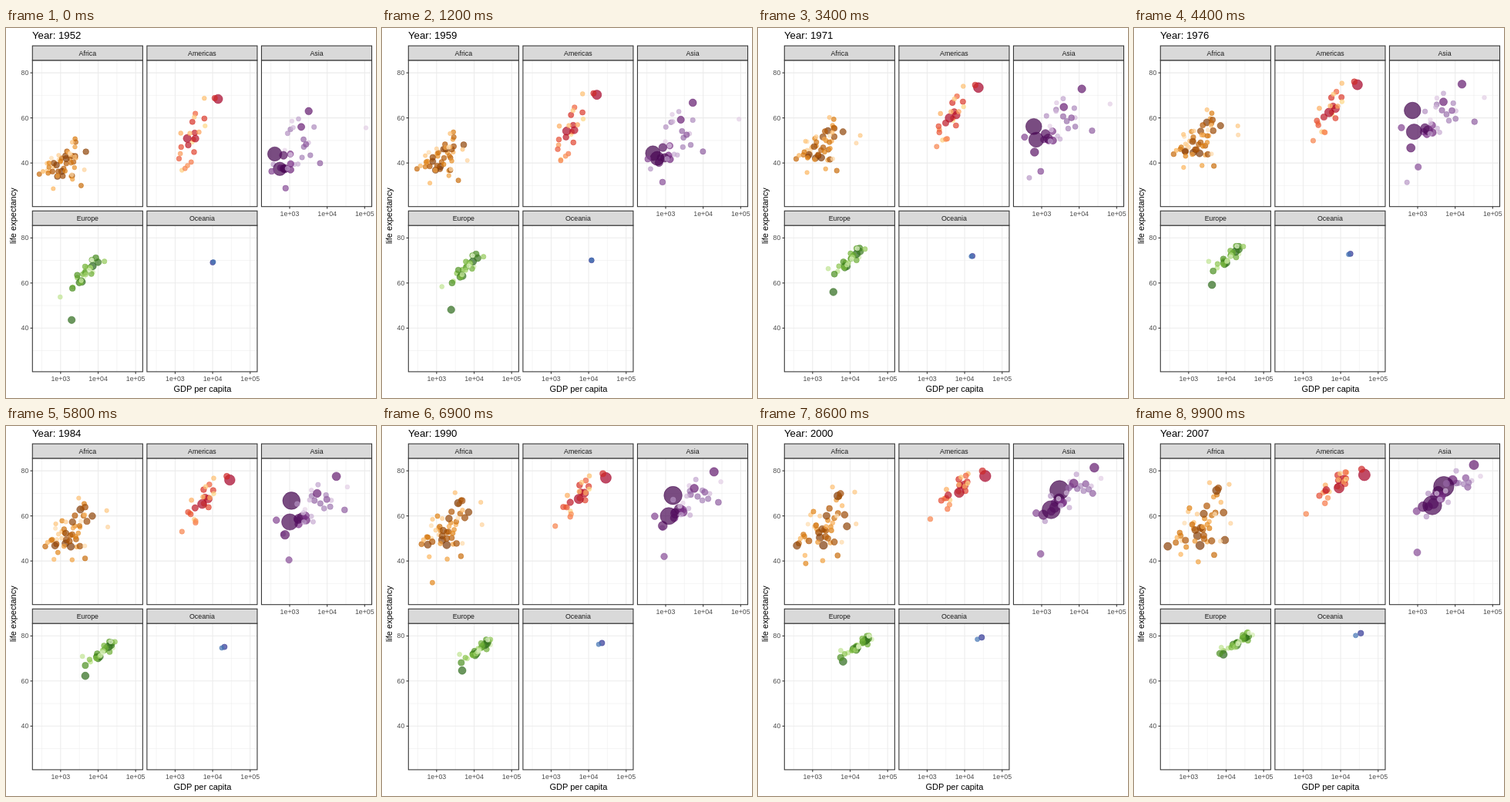
An HTML page for the animation above (10000 ms loop, 480 by 480 pixels).

```html
<!DOCTYPE html>
<html lang="en">
<head>
<meta charset="utf-8">
<title>Life expectancy and GDP</title>
<style>
html, body { margin: 0; width: 100%; height: 100%; overflow: hidden; background: #fff; }
svg { display: block; width: 480px; height: 480px; font: 8.8px "Liberation Sans", Arial, sans-serif; }
.major, .minor { stroke: #ebebeb; stroke-width: 1.07; }
.minor { stroke-width: .53; }
.tick { stroke: #333; stroke-width: 1.07; }
.frame { fill: none; stroke: #333; stroke-width: 1.07; }
.strip { fill: #d9d9d9; stroke: #333; stroke-width: 1.07; }
.label { fill: #1a1a1a; text-anchor: middle; }
.axis { fill: #4d4d4d; text-anchor: middle; }
.side { text-anchor: end; }
.name { font-size: 11px; text-anchor: middle; }
.title { font-size: 13.2px; }
.dot { stroke-width: .7; fill-opacity: .7; stroke-opacity: .7; }
</style>
</head>
<body>
<svg id="stage" viewBox="0 0 480 480"></svg>
<script>
const stage = document.getElementById('stage');
const FIRST = 1952, LAST = 2007, FRAMES = 100, STEP = 100;
const WIDE = 143.07, HIGH = 189.8, GAP = 5.5;

const xOf = logGdp => (logGdp - 2.249) * 48.66;
const yOf = life => (85.55 - life) * 2.925;
const mix = (a, b, k) => a + (b - a) * k;

let seed = 7;
const random = () => (seed = seed * 16807 % 2147483647) / 2147483647;
const bell = () => (random() + random() - 1) * 2.2;

// trend:   year, log GDP, life of the typical country
// spread:  GDP deviation, life per GDP decade, life deviation; at start and end
// leaders: by population rank, points of year, GDP, life
const regions = [
  {
    name: 'Africa', col: 0, row: 0, count: 52, past: .3,
    ramp: ['7f3b08', 'b35806', 'e08214', 'fdb863', 'fee0b6'],
    people: i => 105 * Math.exp(-.105 * i),
    trend: [[1952, 2.96, 39.2], [1967, 3.06, 45.2], [1977, 3.13, 49.5], [1987, 3.11, 53.2], [2007, 3.18, 55]],
    spread: [[.26, 5, 4.5], [.38, 9, 6.5]],
    leaders: {
      0: [[1952, 1077, 36.3], [1977, 1982, 44.5], [2007, 2014, 46.9]],
      1: [[1952, 1419, 41.9], [2007, 5581, 71.3]],
      3: [[1952, 781, 39.1], [1987, 673, 47.4], [2007, 278, 46.5]],
      4: [[1952, 4725, 45], [1992, 7226, 61.9], [2007, 9270, 49.3]],
      9: [[1952, 2449, 43.1], [2007, 6223, 72.3]],
      19: [[1952, 3521, 30], [2007, 4797, 42.7]],
      27: [[1952, 493, 40], [1987, 848, 44], [1992, 737, 23.6], [1997, 590, 36.1], [2007, 863, 46.2]],
      43: [[1952, 2388, 42.7], [1972, 21011, 52.8], [2007, 12057, 74]],
      47: [[1952, 4293, 37], [1977, 21746, 52.8], [2007, 13206, 56.7]]
    }
  },
  {
    name: 'Americas', col: 1, row: 0, count: 25, past: .45,
    ramp: ['a50026', 'd73027', 'f46d43', 'fdae61', 'fee090'],
    people: i => [301, 190, 109][i] || 46 * Math.exp(-.15 * (i - 3)),
    trend: [[1952, 3.5, 53.5], [1967, 3.64, 60.6], [1977, 3.77, 64.8], [1992, 3.75, 70], [2007, 3.9, 74]],
    spread: [[.2, 20, 6], [.24, 9, 2.5]],
    leaders: {
      0: [[1952, 13990, 68.4], [2007, 42952, 78.2]],
      1: [[1952, 2109, 50.9], [2007, 9066, 72.4]],
      2: [[1952, 3478, 50.8], [2007, 11978, 76.2]],
      5: [[1952, 11367, 68.8], [2007, 36319, 80.7]],
      13: [[1952, 2677, 40.4], [2007, 3822, 65.6]],
      14: [[1952, 1840, 37.6], [2007, 1202, 60.9]]
    }
  },
  {
    name: 'Asia', col: 2, row: 0, count: 33, past: .4,
    ramp: ['40004b', '762a83', '9970ab', 'c2a5cf', 'e7d4e8'],
    people: i => [1319, 1110][i] || 240 * Math.exp(-.16 * (i - 2)),
    trend: [[1952, 3.2, 48], [1967, 3.42, 56.3], [1977, 3.6, 61.2], [1992, 3.68, 67.8], [2007, 3.85, 72]],
    spread: [[.3, 12, 6], [.42, 9, 3]],
    leaders: {
      0: [[1952, 400, 44], [1962, 488, 44.5], [1977, 741, 64], [2007, 4959, 73]],
      1: [[1952, 547, 37.4], [1977, 813, 54.2], [2007, 2452, 64.7]],
      2: [[1952, 750, 37.5], [2007, 3541, 70.7]],
      3: [[1952, 685, 43.4], [2007, 2606, 65.5]],
      4: [[1952, 684, 37.5], [1977, 660, 46.9], [2007, 1391, 64.1]],
      5: [[1952, 3217, 63], [1967, 9848, 71.4], [2007, 31656, 82.6]],
      11: [[1952, 331, 36.3], [1977, 371, 56.1], [2007, 944, 62.1]],
      12: [[1952, 779, 28.8], [1982, 978, 39.9], [2007, 975, 43.8]],
      14: [[1952, 6460, 39.9], [1977, 34168, 58.7], [2007, 21655, 72.8]],
      22: [[1952, 368, 39.4], [1977, 525, 31.2], [1982, 624, 51], [2007, 1714, 59.7]],
      31: [[1952, 108382, 55.6], [1977, 59265, 69.3], [1987, 28118, 74.2], [2007, 47307, 77.6]]
    }
  },
  {
    name: 'Europe', col: 0, row: 1, count: 30, past: .72,
    ramp: ['276419', '4d9221', '7fbc41', 'b8e186', 'e6f5d0'],
    people: i => 88 * Math.exp(-.145 * i),
    trend: [[1952, 3.68, 65], [1967, 3.94, 69.8], [1977, 4.1, 71.9], [1992, 4.14, 74.4], [2007, 4.36, 77.6]],
    spread: [[.21, 15, 2], [.25, 9, 1]],
    leaders: {
      0: [[1952, 7144, 67.5], [2007, 32170, 79.4]],
      1: [[1952, 1969, 43.6], [1977, 4269, 59.5], [2007, 8458, 71.8]],
      3: [[1952, 9980, 69.2], [2007, 33203, 79.4]],
      17: [[1952, 14734, 69.6], [2007, 37506, 81.7]],
      23: [[1952, 974, 53.8], [1977, 3528, 69.9], [2007, 7446, 74.9]]
    }
  },
  {
    name: 'Oceania', col: 1, row: 1, count: 2, past: .45,
    ramp: ['313695', '4575b4'],
    people: i => [20, 4][i],
    trend: [[1952, 4.01, 69.2], [1967, 4.16, 71.2], [1977, 4.24, 72.9], [1992, 4.32, 77], [2007, 4.47, 80.7]],
    leaders: {
      0: [[1952, 10040, 69.1], [2007, 34435, 81.2]],
      1: [[1952, 10557, 69.4], [2007, 25185, 80.2]]
    }
  }
];

// Point of a path of [year, x, y] at a given year
function along(path, year) {
  let i = 1;
  while (i < path.length - 1 && path[i][0] < year) i++;
  const a = path[i - 1], b = path[i], k = (year - a[0]) / (b[0] - a[0]);
  return [mix(a[1], b[1], k), mix(a[2], b[2], k)];
}

function shade(ramp, k) {
  const at = k * (ramp.length - 1), i = Math.min(Math.floor(at), ramp.length - 2);
  const part = (hex, c) => parseInt(hex.slice(c * 2, c * 2 + 2), 16);
  return `rgb(${[0, 1, 2].map(c => Math.round(mix(part(ramp[i], c), part(ramp[i + 1], c), at - i)))})`;
}

function add(parent, tag, attrs, text) {
  const el = document.createElementNS('http://www.w3.org/2000/svg', tag);
  for (const key in attrs) el.setAttribute(key, attrs[key]);
  if (text) el.textContent = text;
  parent.appendChild(el);
  return el;
}
const line = (parent, cls, x1, y1, x2, y2) => add(parent, 'line', { class: cls, x1, y1, x2, y2 });

function buildPanel({ name, col, row }) {
  const left = 34.3 + col * (WIDE + GAP), top = 41.9 + row * 214.2;
  const g = add(stage, 'g', { transform: `translate(${left} ${top})` });
  for (const v of [2.5, 3.5, 4.5]) line(g, 'minor', xOf(v), 0, xOf(v), HIGH);
  for (const v of [30, 50, 70]) line(g, 'minor', 0, yOf(v), WIDE, yOf(v));
  for (const v of [3, 4, 5]) {
    line(g, 'major', xOf(v), 0, xOf(v), HIGH);
    if (row || col === 2) {
      line(g, 'tick', xOf(v), HIGH, xOf(v), HIGH + 2.8);
      add(g, 'text', { class: 'axis', x: xOf(v), y: HIGH + 12.2 }, '1e+0' + v);
    }
  }
  for (const v of [40, 60, 80]) {
    line(g, 'major', 0, yOf(v), WIDE, yOf(v));
    if (!col) {
      line(g, 'tick', -2.8, yOf(v), 0, yOf(v));
      add(g, 'text', { class: 'axis side', x: -5, y: yOf(v) + 3.1 }, v);
    }
  }
  const layer = add(g, 'g', {});
  add(g, 'rect', { class: 'frame', width: WIDE, height: HIGH });
  add(g, 'rect', { class: 'strip', y: -18.8, width: WIDE, height: 18.8 });
  add(g, 'text', { class: 'label', x: WIDE / 2, y: -6.1 }, name);
  return layer;
}

// Offsets from the trend, for a named path or a random member of the crowd
function leaderPath(points, trend) {
  return points.map(([year, gdp, life]) => {
    const [g, l] = along(trend, year);
    return [year, Math.log10(gdp) - g, life - l];
  });
}
function crowdPath([start, end]) {
  const rich = bell(), fit = bell();
  const point = (year, [dev, slope, noise], a, b) => [year, a * dev, a * dev * slope + b * noise];
  return [
    point(FIRST, start, rich, fit),
    point(LAST, end, rich * .8 + bell() * .5, fit * .7 + bell() * .6)
  ];
}

function buildDots(region) {
  const { count, trend, spread, leaders, ramp, people, past } = region;
  const layer = buildPanel(region);
  return Array.from({ length: count }, (_, i) => {
    const color = shade(ramp, i / (count - 1));
    const el = add(layer, 'circle', { class: 'dot', fill: color, stroke: color });
    if (i % 2 === 0) layer.prepend(el);
    const path = leaders[i] ? leaderPath(leaders[i], trend) : crowdPath(spread);
    return { el, path, trend, people: people(i), past };
  });
}

const dots = regions.flatMap(buildDots);
add(stage, 'text', { class: 'name', x: 255, y: 472 }, 'GDP per capita');
add(stage, 'text', { class: 'name', transform: 'translate(13 243.7) rotate(-90)' }, 'life expectancy');
const title = add(stage, 'text', { class: 'title', x: 34, y: 14.2 });

function place({ el, path, trend, people, past }, year) {
  const [g, l] = along(trend, year), [dg, dl] = along(path, year);
  const left = (LAST - year) / (LAST - FIRST);
  const size = 2 + 10 * Math.sqrt(people * past ** left / 1319);
  el.setAttribute('cx', xOf(g + dg).toFixed(2));
  el.setAttribute('cy', yOf(l + dl).toFixed(2));
  el.setAttribute('r', (.375 * (size * 2.845 + .945)).toFixed(2));
}

function draw() {
  const frame = Math.floor(performance.now() / STEP) % FRAMES;
  const year = mix(FIRST, LAST, frame / (FRAMES - 1));
  title.textContent = 'Year: ' + Math.round(year);
  for (const dot of dots) place(dot, year);
  requestAnimationFrame(draw);
}
draw();
</script>
</body>
</html>
```
